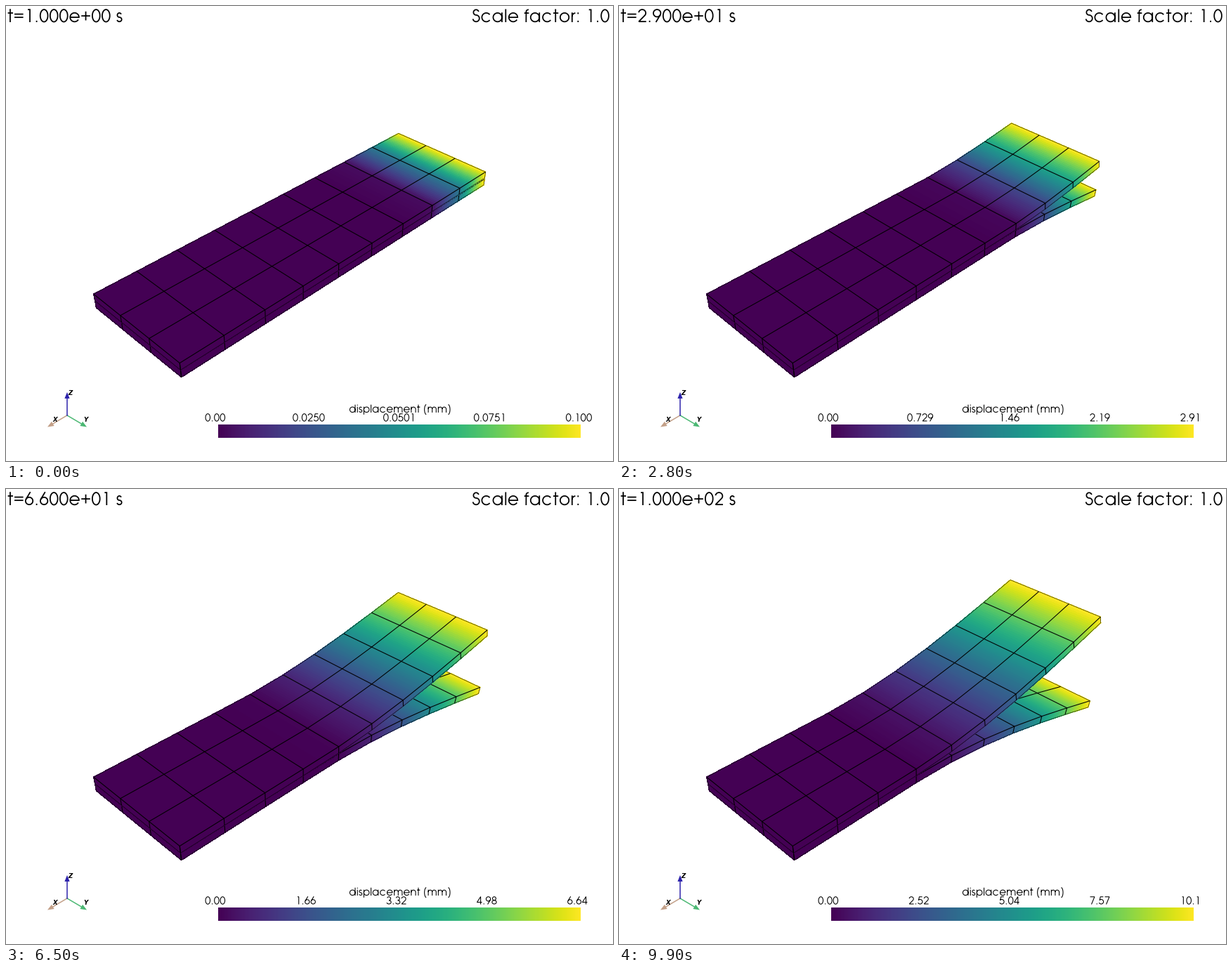
These frames come from a looping animation (864x648 px, 10 s). A matplotlib script:

```python
import numpy as np
import matplotlib.pyplot as plt
from matplotlib.animation import FuncAnimation
from matplotlib.collections import LineCollection, PolyCollection
from matplotlib.path import Path

STAGE_W, STAGE_H, DPI = 864, 648, 100
PT = 72 / DPI
FRAMES, INTERVAL = 100, 100

# Plate made of two stacked layers, in mm
LENGTH, WIDTH, HEIGHT = 84, 24.8, 3.2
CELLS, ROWS, STRIPS = 9, 3, 16
CELL = LENGTH / CELLS
STATIONS = np.linspace(0, LENGTH, CELLS + 1)
ACROSS = np.linspace(-WIDTH / 2, WIDTH / 2, ROWS + 1)

# Isometric perspective camera, 30 degree view angle
VIEW = np.radians(15)
DIST = np.sqrt(LENGTH**2 + WIDTH**2 + HEIGHT**2) / 2 / np.sin(VIEW)
FOCAL = STAGE_H / 2 / np.tan(VIEW)
CENTER = STAGE_W / 2, STAGE_H / 2

# Crack front (in cells from the clamped end) over time
CRACK_T = [1, 19, 29, 50, 66, 76, 100]
CRACK_X = [6.7, 5.95, 5.66, 3.9, 3.6, 3.2, 2.9]

BAR = 302, 817.5, 596, 615
CMAP = plt.get_cmap("viridis")


# ---- geometric stroke lettering, 1000 units per em ----
def arc(cx, cy, rx, ry, a=0, b=360):
    q = np.radians(np.linspace(a, b, 33))
    return np.column_stack([cx + rx * np.cos(q), cy + ry * np.sin(q)])


def seg(*xy):
    return np.reshape(xy, (-1, 2)).astype(float)


def join(*parts):
    return np.vstack(parts)


def bowl(cx, a=0, b=360):
    return arc(cx, 273, 248, 248, a, b)


GLYPHS = {
    " ": (277, []),
    ".": (277, [seg(138, 0, 138, 85)]),
    ":": (277, [seg(138, 0, 138, 85), seg(138, 462, 138, 547)]),
    "=": (606, [seg(55, 270, 550, 270), seg(55, 450, 550, 450)]),
    "+": (606, [seg(55, 350, 550, 350), seg(303, 100, 303, 600)]),
    "(": (369, [arc(310, 285, 200, 480, 100, 260)]),
    ")": (369, [arc(60, 285, 200, 480, 80, -80)]),
    "0": (554, [arc(277, 363, 213, 345)]),
    "1": (554, [seg(200, 705, 315, 705, 315, 0)]),
    "2": (554, [join(arc(277, 510, 198, 198, 170, -38), seg(85, 33, 500, 33))]),
    "3": (554, [arc(277, 542, 165, 166, 160, -90), arc(277, 205, 205, 172, 90, -165)]),
    "4": (554, [seg(390, 0, 390, 720, 50, 190, 515, 190)]),
    "5": (554, [join(seg(460, 705, 190, 705, 125, 390), arc(265, 245, 213, 213, 130, -155))]),
    "6": (554, [arc(277, 237, 205, 205), seg(100, 340, 340, 740)]),
    "7": (554, [seg(55, 705, 475, 705, 185, 0)]),
    "8": (554, [arc(277, 545, 160, 163), arc(277, 207, 203, 175)]),
    "9": (554, [arc(277, 503, 205, 205), seg(454, 400, 214, 0)]),
    "S": (498, [arc(249, 555, 150, 152, 15, 270), arc(249, 215, 185, 188, 90, -170)]),
    "a": (683, [bowl(320), seg(570, 0, 570, 547)]),
    "c": (647, [bowl(327, 38, 322)]),
    "d": (685, [bowl(320), seg(570, 0, 570, 740)]),
    "e": (650, [join(seg(77, 273), bowl(325, 0, 328))]),
    "f": (314, [join(seg(130, 0), arc(260, 580, 130, 127, 180, 85)), seg(25, 514, 290, 514)]),
    "i": (200, [seg(100, 0, 100, 547), seg(100, 655, 100, 740)]),
    "l": (200, [seg(100, 0, 100, 740)]),
    "m": (938, [seg(100, 0, 100, 547),
                join(arc(284, 331, 184, 184, 180, 0), seg(468, 0)),
                join(arc(652, 331, 184, 184, 180, 0), seg(836, 0))]),
    "n": (610, [seg(100, 0, 100, 547), join(arc(305, 310, 205, 205, 180, 0), seg(510, 0))]),
    "o": (655, [bowl(327)]),
    "p": (682, [bowl(363), seg(112, -190, 112, 547)]),
    "r": (301, [seg(100, 0, 100, 547), arc(290, 325, 190, 190, 180, 92)]),
    "s": (388, [arc(194, 395, 113, 121, 25, 270), arc(194, 152, 130, 122, 90, -165)]),
    "t": (339, [seg(155, 0, 155, 740), seg(25, 514, 315, 514)]),
}


class Label:
    """A line of stroke lettering; align is 0 left, 0.5 centre, 1 right."""

    def __init__(self, ax, x, base, size, align=0.0, text=""):
        self.x, self.base, self.scale, self.align = x, base, size / 1000, align
        (self.line,) = ax.plot([], [], color="black", lw=0.07 * size * PT,
                               solid_capstyle="butt", solid_joinstyle="miter")
        self.write(text)

    def write(self, text):
        pen, parts = 0, [seg(np.nan, np.nan)]
        for ch in text:
            advance, strokes = GLYPHS[ch]
            for stroke in strokes:
                parts += [stroke + (pen, 0), seg(np.nan, np.nan)]
            pen += advance
        x, y = np.vstack(parts).T * self.scale
        self.line.set_data(self.x - self.align * pen * self.scale + x, self.base - y)


# ---- plate ----
def project(x, y, z):
    depth = DIST - (x + y + z) / np.sqrt(3)
    right = (y - x) / np.sqrt(2)
    up = (2 * z - x - y) / np.sqrt(6)
    return np.stack([CENTER[0] + FOCAL * right / depth,
                     CENTER[1] - FOCAL * up / depth], axis=-1)


def bend(t):
    """Cantilever deflection, slope and shortening at the mesh stations."""
    tip = 0.1 * t
    start = np.interp(t, CRACK_T, CRACK_X) * CELL
    a = LENGTH - start
    q = np.clip((STATIONS - start) / a, 0, 1)
    drop = tip * (3 * q**2 - q**3) / 2
    slope = tip / a * (3 * q - 1.5 * q**2)
    short = tip**2 / a * (1.5 * q**3 - 1.125 * q**4 + 0.225 * q**5)
    return drop, slope, short


def fibre(shape, side, z):
    """Deformed x, z and displacement size along one layer surface."""
    drop, slope, short = shape
    dx = 1.06 * (short + (z - side * HEIGHT / 4) * side * slope)
    return LENGTH / 2 - STATIONS + dx, z + side * drop, np.hypot(dx, drop)


def shade(p, q, value):
    """Quads from each strip's start to its cell's end, so later ones cover."""
    f = (np.arange(STRIPS) / STRIPS)[None, :, None]

    def walk(c):
        begin = c[:-1, None] + (c[1:] - c[:-1])[:, None] * f
        return begin, np.broadcast_to(c[1:, None], begin.shape)

    (p0, p1), (q0, q1) = walk(p), walk(q)
    quads = np.stack([p0, p1, q1, q0], axis=2).reshape(-1, 4, 2)
    mid = (np.arange(CELLS * STRIPS) + 0.5) / STRIPS
    return quads, np.interp(mid, np.arange(CELLS + 1), value)


def layer(shape, side):
    """Visible quads, their values, mesh edges, outline and peak of one layer."""
    hi, lo = (HEIGHT / 2, 0) if side > 0 else (0, -HEIGHT / 2)
    xt, zt, mt = fibre(shape, side, hi)
    xb, zb, mb = fibre(shape, side, lo)
    top = [project(xt, y, zt) for y in ACROSS]
    low = project(xb, ACROSS[-1], zb)
    end_top = project(xt[0], ACROSS, zt[0])
    end_low = project(xb[0], ACROSS, zb[0])

    roof, roof_val = shade(top[0], top[-1], mt)
    wall, wall_val = shade(top[-1], low, (mt + mb) / 2)
    end = np.array([[end_top[0], end_top[-1], end_low[-1], end_low[0]]])
    quads = np.concatenate([roof, wall, end])
    values = np.concatenate([roof_val, wall_val, [0]])

    edges = top + [low, end_low]
    edges += [np.array(pair) for pair in zip(top[0], top[-1])]
    edges += [np.array(pair) for pair in zip(top[-1], low)]
    edges += [np.array(pair) for pair in zip(end_top, end_low)]
    outline = np.vstack([top[0], top[-1][-1:], low[::-1], end_low[:1], top[0][:1]])
    return quads, values, edges, outline, max(mt.max(), mb.max())


# ---- stage ----
fig = plt.figure(figsize=(STAGE_W / DPI, STAGE_H / DPI), dpi=DPI, facecolor="white")
ax = fig.add_axes([0, 0, 1, 1])
ax.axis("off")

ax.imshow(np.linspace(0, 1, 256)[None, :], cmap=CMAP, aspect="auto",
          interpolation="nearest", extent=(BAR[0], BAR[1], BAR[3], BAR[2]))
ax.set_xlim(0, STAGE_W)
ax.set_ylim(STAGE_H, 0)
ax.set_autoscale_on(False)

faces, wires = {}, {}
for z, side in enumerate((-1, 1)):
    faces[side] = PolyCollection([], antialiased=False, linewidths=0, zorder=2 + 2 * z)
    wires[side] = LineCollection([], colors="black", linewidths=1.05 * PT, zorder=3 + 2 * z)
    ax.add_collection(faces[side], autolim=False)
    ax.add_collection(wires[side], autolim=False)


def arrow(dx, dy, color, name, at):
    base = np.array([87.0, 583.0])
    tip = base + (dx, dy)
    unit = np.array([dx, dy]) / np.hypot(dx, dy)
    neck, wing = tip - 9 * unit, 3.6 * unit[::-1] * (-1, 1)
    ax.plot(*zip(base, neck), color=color, lw=1.5 * PT)
    ax.fill(*zip(tip, neck + wing, neck - wing), color=color, lw=0)
    ax.text(*at, name, family="DejaVu Sans", style="italic", weight="bold",
            size=8.6 * PT, ha="center", va="center_baseline", zorder=6)


arrow(-28, 16.5, "#c3a088", "X", (70, 589))
arrow(28, 16.5, "#4bb873", "Y", (114, 589))
arrow(0, -33, "#2c22ac", "Z", (91.5, 551))

Label(ax, 859.5, 23, 25.1, 1, "Scale factor: 1.0")
Label(ax, 561, 579, 15.2, 0.5, "displacement (mm)")
clock = Label(ax, 2, 23, 25.4)
ticks = [Label(ax, x, 591.5, 15.2, 0.5) for x in np.linspace(BAR[0], BAR[1], 5)]


def update(i):
    t = i + 1
    shape = bend(t)
    parts = {side: layer(shape, side) for side in (-1, 1)}
    peak = max(p[-1] for p in parts.values())
    for side, (quads, values, edges, outline, _) in parts.items():
        faces[side].set_verts(quads)
        faces[side].set_facecolor(CMAP(values / peak))
        wires[side].set_segments(edges)
        # Outer edges show only their inner half
        wires[side].set_clip_path(Path(outline), ax.transData)
    clock.write(f"t={t:.3e} s")
    for k, tick in enumerate(ticks):
        tick.write(f"{peak * k / 4:#.3g}".ljust(6))
    return []


anim = FuncAnimation(fig, update, frames=FRAMES, interval=INTERVAL,
                     init_func=lambda: update(0), repeat=True, repeat_delay=0)
plt.show()
```
